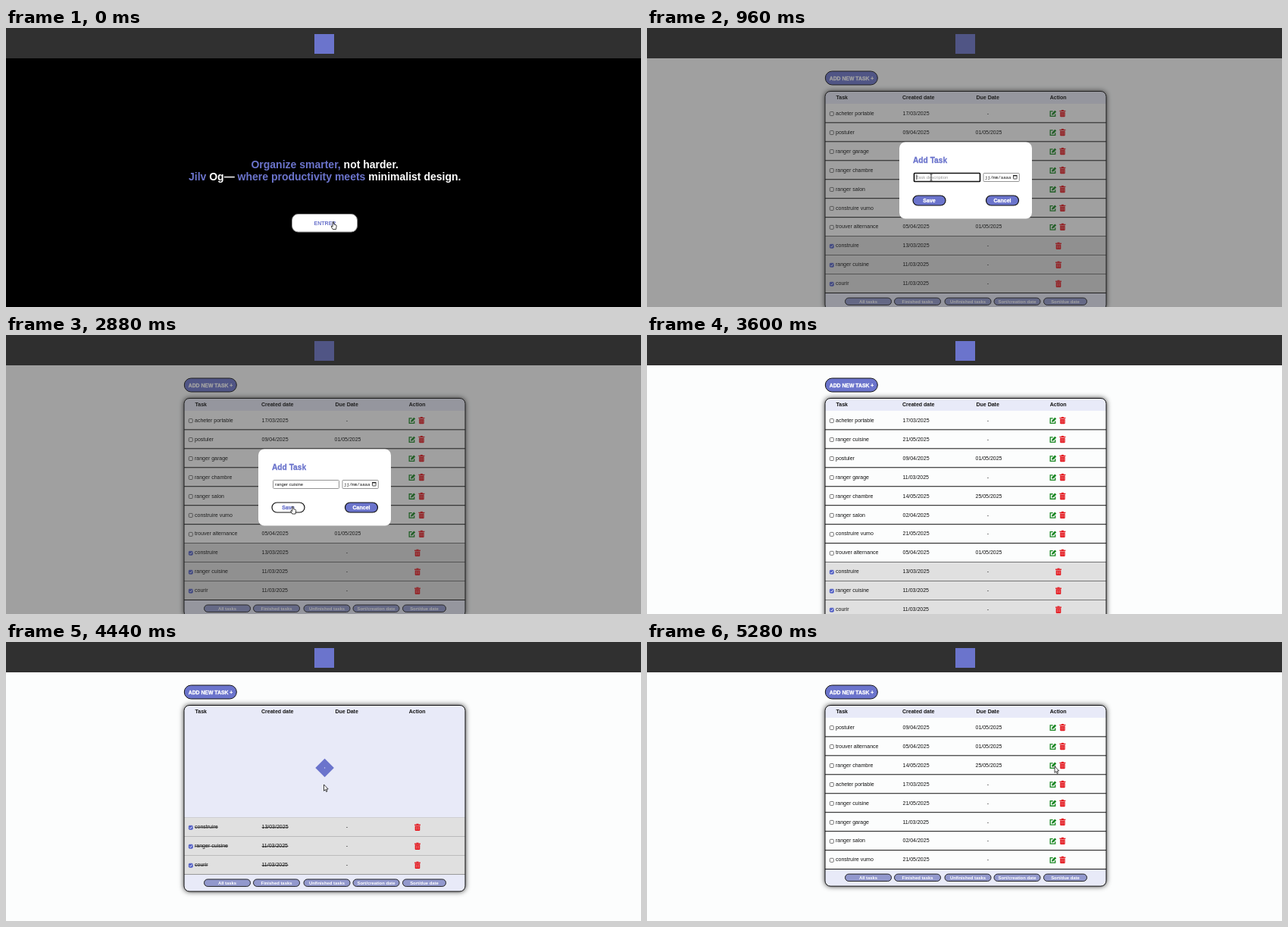
An HTML page with a canvas that plays this animation: 838x368 px, repeating every 5400 ms.

```html
<!DOCTYPE html>
<html lang="fr">
<head>
<meta charset="utf-8">
<title>Task list</title>
<style>
html, body { margin: 0; width: 100%; height: 100%; overflow: hidden; background: #000; }
canvas { display: block; }
</style>
</head>
<body>
<canvas id="stage" width="838" height="368"></canvas>
<script>
const ctx = document.getElementById('stage').getContext('2d');
const LOOP = 5400, STEP = 120;
const BLUE = '#6b74cc', PAGE = '#fcfdfd', PANEL = '#e8eaf8', DONE = '#e0e0e0';
const SANS = '"Liberation Sans", Arial, sans-serif';
const MONO = '"Liberation Mono", monospace';
const LEFT = 235, RIGHT = 606, TOP = 83.5, BODY = 99.9, ROW = 24.96;

const portable = ['acheter portable', '17/03/2025'];
const postuler = ['postuler', '09/04/2025', '01/05/2025'];
const garage = ['ranger garage', '11/03/2025'];
const chambre = ['ranger chambre', '14/05/2025', '25/05/2025'];
const salon = ['ranger salon', '02/04/2025'];
const build = ['construire vumo', '21/05/2025'];
const trouver = ['trouver alternance', '05/04/2025', '01/05/2025'];
const cuisine = ['ranger cuisine', '21/05/2025'];
const before = [portable, postuler, garage, chambre, salon, build, trouver];
const added = [portable, cuisine, ...before.slice(1)];
const sorted = [postuler, trouver, chambre, portable, cuisine, garage, salon, build];
const finished = [['construire', '13/03/2025'], ['ranger cuisine', '11/03/2025'], ['courir', '11/03/2025']];

// time, x, y, shape
const pointer = [
  [0, 432, 255.5, 'hand'], [120, 431.5, 255, 'arrow'], [360, 431.5, 255, 'arrow'],
  [600, 290, 64, 'hand'], [720, 290, 64, 'arrow'], [960, 375, 197, 'beam'],
  [1560, 375, 197, 'none'], [2160, 375, 200, 'arrow'], [2520, 378.5, 226, 'hand'],
  [3000, 378.5, 226, 'arrow'], [3240, 400, 300, 'arrow'], [3600, 424, 375, 'none'],
  [3720, 423, 345, 'arrow'], [4080, 420, 190, 'arrow'], [4200, 419.5, 188, 'arrow'],
  [4560, 419.5, 188, 'arrow'], [4920, 424, 310, 'arrow'], [5040, 424, 310, 'arrow'],
  [5280, 538, 164, 'arrow'], [5400, 538, 164, 'arrow']
];

function rect(x, y, w, h, color) {
  ctx.fillStyle = color;
  ctx.fillRect(x, y, w, h);
}

function box(x, y, w, h, r, fill, stroke, line = 1) {
  ctx.beginPath();
  ctx.roundRect(x, y, w, h, r);
  if (fill) { ctx.fillStyle = fill; ctx.fill(); }
  if (stroke) { ctx.strokeStyle = stroke; ctx.lineWidth = line; ctx.stroke(); }
}

function text(str, x, y, size, color = '#111', weight = '', align = 'left', family = SANS) {
  ctx.font = `${weight} ${size}px ${family}`;
  ctx.textAlign = align;
  ctx.fillStyle = color;
  ctx.fillText(str, x, y);
}

function heavyText(str, x, y, size, color, align) {
  text(str, x, y, size, color, 'bold', align);
  ctx.strokeStyle = color;
  ctx.lineWidth = 0.3;
  ctx.strokeText(str, x, y);
}

function poly(points, fill, stroke, line = 0.9) {
  ctx.beginPath();
  points.forEach(([x, y]) => ctx.lineTo(x, y));
  if (fill) { ctx.closePath(); ctx.fillStyle = fill; ctx.fill(); }
  if (stroke) { ctx.strokeStyle = stroke; ctx.lineWidth = line; ctx.stroke(); }
}

function at(x, y, draw) {
  ctx.save();
  ctx.translate(x, y);
  draw();
  ctx.restore();
}

function header() {
  rect(0, 0, 838, 40, '#303030');
  rect(407, 8, 26, 26, BLUE);
}

function colouredLine(parts, y) {
  ctx.font = `bold 14px ${SANS}`;
  let x = 420.7 - ctx.measureText(parts.join('')).width / 2;
  parts.forEach((part, i) => {
    text(part, x, y, 14, i % 2 ? '#fff' : BLUE, 'bold');
    x += ctx.measureText(part).width;
  });
}

function landing() {
  rect(0, 0, 838, 368, '#000');
  header();
  colouredLine(['Organize smarter, ', 'not harder.'], 185);
  colouredLine(['Jilv ', 'Og— ', 'where productivity meets ', 'minimalist design.'], 201);
  box(377.5, 245.5, 86, 23.5, 8, '#fff', '#999');
  text('ENTRER', 421, 260.2, 7, BLUE, 'bold', 'center');
}

function editIcon(x, y) {
  at(x, y, () => {
    poly([[0, -3], [-3.5, -3], [-3.5, 3.5], [3, 3.5], [3, 0.5]], null, '#16851f', 1.3);
    poly([[-1.6, 1.8], [-1.3, -0.2], [2.6, -4.2], [4.5, -2.3], [0.5, 1.6]], '#16851f');
  });
}

function trashIcon(x, y) {
  at(x, y, () => {
    const red = '#e3151c';
    rect(-4, -3.8, 8, 1.3, red);
    rect(-1.5, -4.7, 3, 1.2, red);
    box(-3.3, -2, 6.6, 6.6, [0, 0, 1, 1], red);
    for (const dx of [-1.8, 0, 1.8]) rect(dx - 0.25, -0.9, 0.5, 4.3, '#f6b4b4');
  });
}

function taskRow([name, created, due = '-'], y, done, struck) {
  const mid = y + 12.5, base = mid + 2.3;
  if (done) rect(LEFT, y, RIGHT - LEFT, ROW, DONE);
  box(241.3, mid - 1.8, 5, 5, 1, done ? '#4f5cc4' : '#fff', done ? '#4f5cc4' : '#555', 0.8);
  if (done) poly([[242.3, mid + 0.8], [243.5, mid + 2], [245.5, mid - 0.6]], null, '#fff');
  text(name, 249, base, 7);
  text(created, 337.5, base, 7);
  text(due, due === '-' ? 450 : 451, base, 7, '#111', '', 'center');
  if (struck) {
    ctx.font = `7px ${SANS}`;
    rect(249, mid, ctx.measureText(name).width, 0.7, '#222');
    rect(337.5, mid, 35, 0.7, '#222');
  }
  if (done) trashIcon(543, mid + 0.3);
  else {
    editIcon(535.7, mid + 0.5);
    trashIcon(548.4, mid + 0.3);
  }
  rect(LEFT, y + ROW - 0.5, RIGHT - LEFT, 1, struck ? '#999' : '#111');
}

function spinner(angle) {
  at(420.6, 166, () => {
    ctx.rotate(angle);
    rect(-8.7, -8.7, 17.4, 17.4, BLUE);
    rect(-0.6, -0.6, 1.2, 1.2, '#e8eaf8');
  });
}

function listPage({ open, closed, loading, spin, hover }) {
  rect(0, 0, 838, 368, PAGE);
  header();
  box(235.3, 57, 69, 18, 9, hover ? '#fff' : BLUE, '#111');
  heavyText('ADD NEW TASK +', 270, 68.7, 6.85, hover ? BLUE : '#fff', 'center');

  const split = loading ? 231.6 : BODY + open.length * ROW;
  const end = split + closed.length * ROW;
  const height = end + 22.5 - TOP;
  ctx.save();
  ctx.shadowColor = 'rgba(0,0,0,.85)';
  ctx.shadowBlur = 7;
  box(LEFT, TOP, RIGHT - LEFT, height, 7, PANEL);
  ctx.restore();

  text('Task', 249.5, 94.3, 7, '#111', 'bold');
  text('Created date', 337, 94.3, 7, '#111', 'bold');
  text('Due Date', 434.5, 94.3, 7, '#111', 'bold');
  text('Action', 531.8, 94.3, 7, '#111', 'bold');

  if (loading) {
    spinner(spin);
    rect(LEFT, split - 0.5, RIGHT - LEFT, 0.6, '#aaa');
  } else {
    rect(LEFT, BODY, RIGHT - LEFT, split - BODY, PAGE);
    open.forEach((task, i) => taskRow(task, BODY + i * ROW, false));
  }
  closed.forEach((task, i) => taskRow(task, split + i * ROW, true, loading));

  const buttons = [['All tasks', 261, 62], ['Finished tasks', 326, 62], ['Unfinished tasks', 392.5, 62],
    ['Sort/creation date', 457.5, 62], ['Sort/due date', 523, 58]];
  for (const [label, x, w] of buttons) {
    box(x + 0.5, end + 6.5, w - 1, 9.4, 4.7, '#9298cd', '#222');
    text(label, x + w / 2, end + 13.3, 5.9, '#fff', 'bold', 'center');
  }
  box(LEFT, TOP, RIGHT - LEFT, height, 7, null, '#111');
}

function pill(label, x, inverted) {
  box(x + 0.5, 221, 43, 13, 6.5, inverted ? '#fff' : BLUE, '#111', 1.2);
  heavyText(label, x + 22, 230, 7, inverted ? BLUE : '#fff', 'center');
}

function modal(t) {
  rect(0, 0, 838, 368, 'rgba(48,48,48,.45)');
  box(333, 150.5, 175, 101, 8, '#fff');
  heavyText('Add Task', 351, 178, 10.2, BLUE, 'left');

  const focused = t < 2760;
  const count = t < 1560 ? 0 : (Math.floor((t - 1560) / STEP) + 1) * 3;
  const typed = cuisine[0].slice(0, count);
  box(352.5, 191.5, 87, 11, 1, '#fff', focused ? '#111' : '#888', focused ? 1.7 : 0.9);
  text(typed || 'Task description', 355, 199, 5.9, typed ? '#111' : '#999');
  if (focused && (t < 1320 || t >= 1560)) {
    const x = 355.5 + (typed ? ctx.measureText(typed).width : 0);
    rect(x, 193.5, 0.8, 6.5, '#111');
  }
  box(444, 191.5, 47.3, 11, 1, '#fff', '#888', 0.9);
  text('jj/mm/aaaa', 446, 199, 5.75, '#111', '', 'left', MONO);
  box(483.5, 194.5, 4.6, 4.5, 0.5, null, '#222', 0.8);
  rect(483.2, 194, 5.2, 1.4, '#222');

  pill('Save', 350.5, t >= 2520);
  pill('Cancel', 447, false);
}

const shapes = {
  none() {},
  arrow() {
    poly([[0, 0], [0, 8.4], [1.9, 6.7], [3.2, 9.5], [4.5, 8.9], [3.2, 6.2], [5.7, 6], [0, 0]], '#fff', '#111', 0.8);
  },
  beam() {
    poly([[-1.5, -4], [1.5, -4]], null, '#222');
    poly([[0, -4], [0, 4]], null, '#222');
    poly([[-1.5, 4], [1.5, 4]], null, '#222');
  },
  hand() {
    poly([[-0.8, 0.3], [0.5, 0.3], [0.8, 3.4], [3.7, 4.4], [4.2, 5.5], [3.5, 10], [-0.7, 10],
      [-2.8, 6.5], [-2.4, 5.5], [-0.9, 6.5], [-0.8, 0.3]], '#fff', '#111', 0.8);
  }
};

function drawPointer(t) {
  const next = pointer.findIndex(key => key[0] > t);
  const [t0, x0, y0, shape] = pointer[next - 1], [t1, x1, y1] = pointer[next];
  const k = (t - t0) / (t1 - t0);
  at(x0 + (x1 - x0) * k, y0 + (y1 - y0) * k, shapes[shape]);
}

function render(t) {
  if (t < 120) landing();
  else {
    const loading = t >= 4440 && t < 4680;
    listPage({
      open: t < 3000 ? before : t < 4680 ? added : sorted,
      closed: t < 5040 ? finished : [],
      loading,
      spin: Math.PI / 4 + (t - 4440) / 1000 * Math.PI * 2,
      hover: t === 600
    });
    if (t >= 720 && t < 3000) modal(t);
  }
  drawPointer(t);
}

const start = performance.now();
function tick() {
  const t = (performance.now() - start) % LOOP;
  render(Math.floor(t / STEP) * STEP);
  requestAnimationFrame(tick);
}
tick();
</script>
</body>
</html>
```
